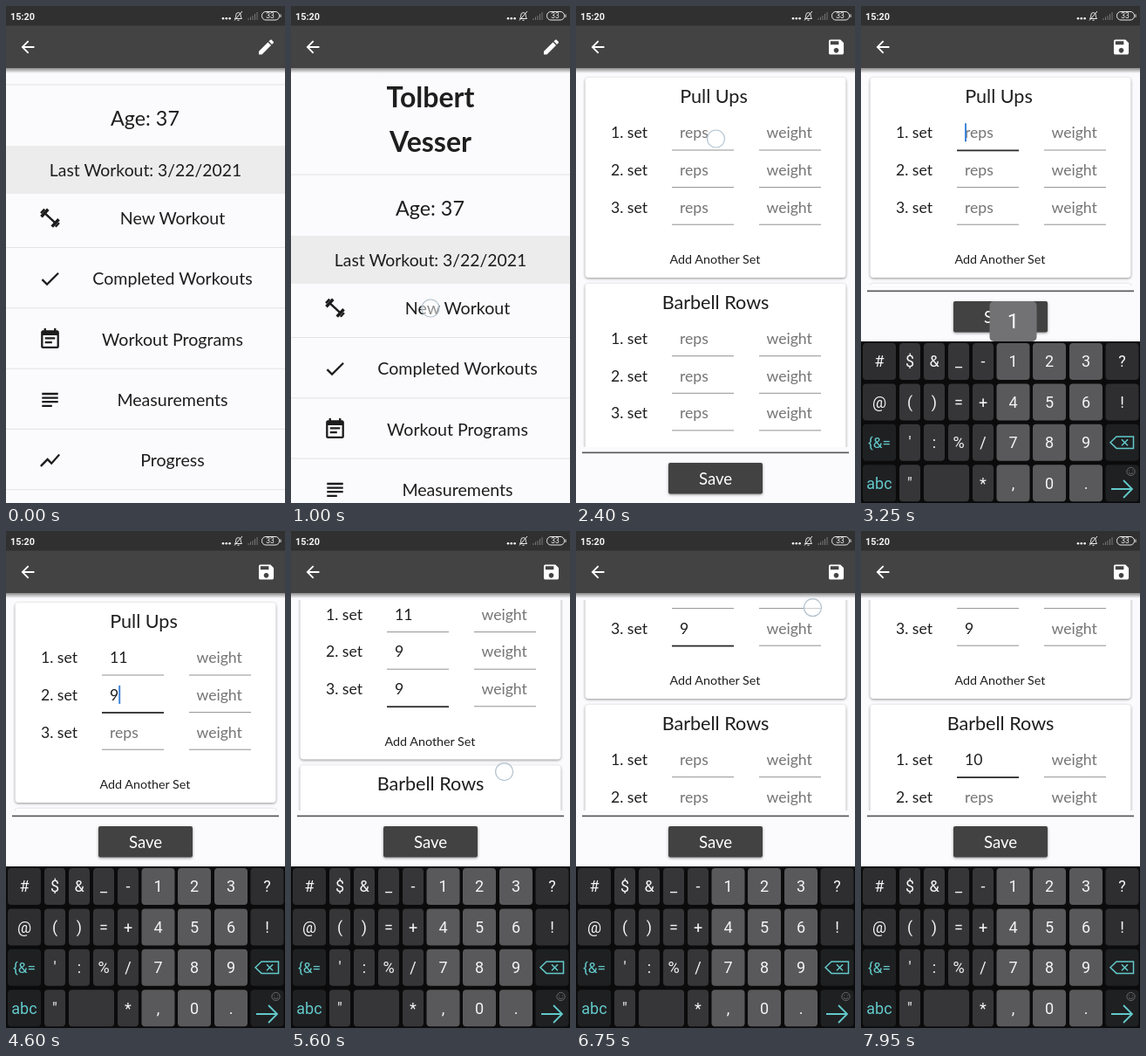
Animation, 320 px wide and 569 px high, one loop 8000 ms. Source, as an HTML page:

```html
<!DOCTYPE html>
<html lang="en">
<head>
<meta charset="utf-8">
<title>Workout log</title>
<style>
html, body { margin: 0; width: 100%; height: 100%; overflow: hidden; background: #fbfafc; }
svg { display: block; width: 100vw; height: 100vh; }
text { font-family: Lato, sans-serif; fill: #1e1e1e; white-space: pre; }
.mid { text-anchor: middle; }
.bold { font-weight: 700; }
.hint { fill: #757575; }
.white { fill: #fff; }
.page { fill: #fbfafc; }
.card { fill: #fff; filter: drop-shadow(0 1px 1.8px rgba(0,0,0,.42)); }
.rule { stroke: #e3e3e3; stroke-width: 1; }
.key, .sys { font-family: Roboto, sans-serif; fill: #f4f4f4; }
.teal { fill: #63c9ca; }
.line { fill: none; stroke: #63c9ca; stroke-width: 1.5; }
</style>
</head>
<body>
<svg id="stage" viewBox="0 0 320 569"></svg>
<script>
const LOOP = 8000;
const ICON = {
  back: 'M20 11H7.83l5.59-5.59L12 4l-8 8 8 8 1.41-1.41L7.83 13H20v-2z',
  edit: 'M3 17.25V21h3.75L17.81 9.94l-3.75-3.75L3 17.25zM20.71 7.04c.39-.39.39-1.02 0-1.41l-2.34-2.34c-.39-.39-1.02-.39-1.41 0l-1.83 1.83 3.75 3.75 1.83-1.83z',
  save: 'M17 3H5c-1.11 0-2 .9-2 2v14c0 1.1.89 2 2 2h14c1.1 0 2-.9 2-2V7l-4-4zm-5 16c-1.66 0-3-1.34-3-3s1.34-3 3-3 3 1.34 3 3-1.34 3-3 3zm3-10H5V5h10v4z',
  check: 'M9 16.17L4.83 12l-1.42 1.41L9 19 21 7l-1.41-1.41z',
  event: 'M17 10H7v2h10v-2zm2-7h-1V1h-2v2H8V1H6v2H5c-1.11 0-1.99.9-1.99 2L3 19c0 1.1.89 2 2 2h14c1.1 0 2-.9 2-2V5c0-1.1-.9-2-2-2zm0 16H5V8h14v11zm-5-5H7v2h7v-2z',
  subject: 'M14 17H4v2h10v-2zm6-8H4v2h16V9zM4 15h16v-2H4v2zM4 5v2h16V5H4z',
  chart: 'M3.5 18.49l6-6.01 4 4L22 6.92l-1.41-1.41-7.09 7.97-4-4L2 16.99z'
};

const text = (s, x, y, size, cls = '', more = '') =>
  `<text x="${x}" y="${y}" font-size="${size}" class="${cls}" ${more}>${s.replace(/&/g, '&amp;')}</text>`;
const mid = (s, x, y, size, cls = '', more = '') => text(s, x, y, size, 'mid ' + cls, more);
const rect = (x, y, w, h, more = '') => `<rect x="${x}" y="${y}" width="${w}" height="${h}" ${more}/>`;
const rule = (y, x1 = 0, x2 = 320) => `<path class="rule" d="M${x1} ${y}H${x2}"/>`;
const icon = (name, x, y, scale, fill = '#1c1c1c') =>
  `<path d="${ICON[name]}" fill="${fill}" transform="translate(${x} ${y}) scale(${scale}) translate(-12 -12)"/>`;

const appBar = action => rect(0, 71, 320, 6, 'fill="url(#shade)"') +
  rect(0, 0, 320, 71, 'fill="#434343"') + rect(0, 0, 320, 22.5, 'fill="#303030"') +
  icon('back', 25, 47, .93, '#fff') + icon(action, 298.5, 47, .95, '#fff');

const dumbbell = `<g transform="translate(50.5 242.7) rotate(43) scale(.88)" stroke="#1c1c1c" fill="none">
  <path d="M-9 0H9" stroke-width="2.8"/><path d="M-9.5 -6.5V6.5M9.5 -6.5V6.5" stroke-width="4"/>
  <path d="M-13 -3.5V3.5M13 -3.5V3.5" stroke-width="2.8"/></g>`;

function profile() {
  const rows = ['New Workout', 'Completed Workouts', 'Workout Programs', 'Measurements', 'Progress'];
  const icons = [null, 'check', 'event', 'subject', 'chart'];
  const list = rows.map((s, i) => {
    const y = 243 + 69.3 * i;
    return mid(s, 191, y + 7, 19.6) + (icons[i] ? icon(icons[i], 50.5, y, 1.15) : dumbbell) + rule(y + 33.5);
  }).join('');
  return rect(0, 0, 320, 569, 'class="page"') + '<g id="menu">' +
    mid('Tolbert', 160, 13, 32, 'bold') + mid('Vesser', 160, 64, 32, 'bold') + rule(90) +
    mid('Age: 37', 159.5, 137.4, 23.3) + rect(0, 160, 320, 55, 'fill="#ececed"') +
    mid('Last Workout: 3/22/2021', 160, 195, 19.35) + list + '</g>' + appBar('edit');
}

function sheet() {
  const items = ['PUSH', 'PULL', 'LEGS'].map((s, i) =>
    rect(7, 322 + 78 * i, 306, 71, 'rx="4" class="card"') + mid(s, 159.7, 367 + 78 * i, 23)).join('');
  return rect(0, 249, 320, 320, 'class="page"') +
    rect(3, 250, 314, 316, 'rx="4" class="card" style="fill:#ececed"') +
    mid('Choose a Program:', 156.5, 290, 28.6, 'bold') + rule(311.5, 4, 316) +
    `<g clip-path="url(#sheetClip)">${items}</g>`;
}

function exercise(name, card) {
  const top = 235.7 * card;
  let out = rect(10.5, 82 + top, 299, 229, 'rx="4" class="card"') + mid(name, 160 - (card ? 0 : 2), 111 + top, 21.6);
  for (let i = 0; i < 3; i++) {
    const y = 151.3 + top + 42.6 * i, id = card * 3 + i;
    out += text(i + 1 + '. set', 40, y, 17.6) + text('reps', 119, y, 17.6, 'hint', `id="reps${id}"`) +
      text('weight', 218.5, y, 17.6, 'hint') +
      rect(110, y + 13.2, 71, 1, `fill="#929292" id="bar${id}"`) + rect(210, y + 13.2, 71, 1, 'fill="#929292"');
  }
  return out + mid('Add Another Set', 159.5, 295.3 + top, 14.3);
}

const workout = () => rect(0, 0, 320, 569, 'class="page"') +
  '<g clip-path="url(#listClip)"><g id="list">' + exercise('Pull Ups', 0) + exercise('Barbell Rows', 1) +
  rect(0, 0, 2, 21, 'fill="#3f86d8" id="cursor"') + '</g></g>' +
  '<g id="footer">' + rect(7, 510.5, 306, 1.7, 'fill="#5a5a5a"') +
  rect(106, 523, 108, 35.5, 'rx="2" class="card" style="fill:#424242"') + mid('Save', 160, 547.7, 18.6, 'white') +
  '</g>' + appBar('save');

const COLS = [[2, 38], [44, 24], [72, 24], [100, 24], [128, 24], [155.5, 38], [197, 38], [239, 38], [280.5, 38]];
const KEYS = ['# $ & _ - 1 2 3 ?', '@ ( ) = + 4 5 6 !', "{&= ' : % / 7 8 9 <", 'abc " _ _ * , 0 . >'].map(r => r.split(' '));

function keyboard() {
  let out = rect(0, 384, 320, 185, 'fill="#0b0b0c"');
  KEYS.forEach((row, r) => row.forEach((s, c) => {
    let [x, w] = COLS[c];
    const y = 386 + 46.4 * r, last = r === 3;
    if (last && c === 3) return;
    const space = last && c === 2;
    if (space) w = 52;
    const special = r > 1 && (c === 0 || c === 8);
    const fill = special ? '#1f2022' : c > 4 && c < 8 ? '#59595b' : c % 8 ? '#363638' : '#2e2e30';
    out += rect(x, y, w, 42, `rx="4" fill="${fill}"`);
    if (!space && !(special && c === 8))
      out += mid(s, x + w / 2, y + 27.3, s === '{&=' ? 17.2 : 18, special ? 'key teal' : 'key');
  }));
  return out + `<path class="line" d="M286 499.7l7-6.7h19.5v13.4h-19.5zM299 496.2l7 7m0-7l-7 7"/>
    <path class="line" style="stroke-width:1.8" d="M287 553h24M301 543l10 10-10 10"/>
    <g fill="none" stroke="#69696b"><circle cx="309.5" cy="533" r="4.6"/><path d="M307 534.5q2.5 2.4 5 0M307.6 531.4v1M311.4 531.4v1"/></g>` +
    '<g id="popup">' + rect(-27, -48, 54, 46, 'rx="5" fill="#727274"') + mid('', 0, -17, 24, 'key', 'id="popText"') + '</g>';
}

const statusBar = () => text('15:20', 5, 16, 10.9, 'sys bold') +
  [249, 252.8, 256.6].map(x => `<circle cx="${x}" cy="14.3" r="1.3" fill="#fff"/>`).join('') +
  `<g fill="none" stroke="#e8e8e8"><path d="M262.5 14.5h8q-1.3-1.5-1.3-4.2a2.7 2.7 0 0 0-5.4 0q0 2.7-1.3 4.2M265.5 16.3h2M262 16.5l9-10.5"/>
  <path d="M278 16v-2M280.5 16v-3.5M283 16v-5M285.5 16v-7M288 16v-9" stroke="#777"/>
  <rect x="293.5" y="6.5" width="20" height="9.5" rx="4.5"/><path d="M315 9.5v3.5"/></g>` + mid('33', 303, 14.2, 8.5, 'sys');

document.getElementById('stage').innerHTML = `<defs>
  <linearGradient id="shade" x2="0" y2="1"><stop stop-opacity=".45"/><stop offset="1" stop-opacity="0"/></linearGradient>
  <clipPath id="sheetClip">${rect(3, 312, 314, 229)}</clipPath>
  <clipPath id="listClip">${rect(7, 79, 306, 426, 'id="listBox"')}</clipPath></defs>
  ${profile()}${rect(0, 0, 320, 569, 'id="scrim"')}<g id="sheet">${sheet()}</g>
  <g id="workout">${workout()}</g><g id="keyboard">${keyboard()}</g>${statusBar()}
  <circle id="touch" r="10" fill="#fff" fill-opacity=".5" stroke="#b3c3cf" stroke-width="1.2"/>`;

const el = {};
document.querySelectorAll('[id]').forEach(e => el[e.id] = e);

const part = (t, a, b) => Math.min(1, Math.max(0, (t - a) / (b - a)));
const out = (t, a, b) => 1 - (1 - part(t, a, b)) ** 2.4;
const smooth = (t, a, b) => { const p = part(t, a, b); return p * p * (3 - 2 * p); };
const move = (e, y, x = 0) => e.setAttribute('transform', `translate(${x} ${y})`);
const show = (e, on) => e.setAttribute('visibility', on ? 'visible' : 'hidden');
const within = (t, spans) => spans.find(([a, b]) => t >= a && t < b);

const FOCUS = [[2550, 0], [4200, 1], [4800, 2], [6950, 3]];
const TYPED = [[3350, 0, '1'], [3750, 0, '11'], [4550, 1, '9'], [5100, 2, '9'], [7550, 3, '1'], [7750, 3, '10']];
const CURSOR = [[2550, 3100], [3250, 4000], [4200, 5200], [6950, 7250], [7500, 7950]];
// start, end, column, row
const PRESS = [[3250, 3400, 5, 0], [4450, 4570, 7, 2], [5000, 5130, 7, 2], [7500, 7600, 5, 0], [7700, 7800, 6, 3]];
// start, end, x, y, then where and when a drag ends
const TOUCH = [[950, 1080, 160, 346], [1750, 1850, 160, 437], [2400, 2550, 160.5, 152],
  [5400, 6150, 243, 312, 250, 152, 6050], [6300, 6790, 262, 84, 271.5, 87.7, 6700]];

function draw(t) {
  move(el.menu, 103 * out(t, 200, 740));
  const open = out(t, 1050, 1340) * (1 - smooth(t, 1780, 1980));
  el.scrim.setAttribute('opacity', .55 * open);
  move(el.sheet, 320 * (1 - open));

  const page = out(t, 1790, 2000);
  el.workout.setAttribute('opacity', page);
  show(el.workout, page > 0);
  move(el.workout, 60 * (1 - page));

  const lift = 185 * out(t, 2620, 2920);
  move(el.keyboard, 185 - lift);
  move(el.footer, -lift);
  el.listBox.setAttribute('height', 426 - lift);
  move(el.list, -194 * smooth(t, 5380, 6050) + 75 * smooth(t, 6290, 6720));

  const focus = FOCUS.reduce((f, [at, id]) => t >= at ? id : f, -1);
  const values = Array(6).fill('');
  TYPED.forEach(([at, id, s]) => { if (t >= at) values[id] = s; });
  values.forEach((s, i) => {
    const label = el['reps' + i], bar = el['bar' + i], on = i === focus;
    label.textContent = s || 'reps';
    label.setAttribute('class', s ? '' : 'hint');
    bar.setAttribute('fill', on ? '#2b2b2b' : '#929292');
    bar.setAttribute('height', on ? 1.8 : 1);
  });
  const blink = focus >= 0 && within(t, CURSOR);
  el.cursor.style.display = blink ? '' : 'none';
  if (blink) move(el.cursor, +el['reps' + focus].getAttribute('y') - 17, 119 + 10.2 * values[focus].length);

  const press = within(t, PRESS);
  show(el.popup, press);
  if (press) {
    const [, , c, r] = press, [x, w] = COLS[c];
    move(el.popup, 386 + 46.4 * r, x + w / 2);
    el.popText.textContent = KEYS[r][c];
  }

  const touch = within(t, TOUCH);
  show(el.touch, touch);
  if (touch) {
    const [a, , x, y, x2 = x, y2 = y, end = a + 1] = touch, p = smooth(t, a, end);
    move(el.touch, y + (y2 - y) * p, x + (x2 - x) * p);
  }
}

const start = performance.now();
function tick() {
  draw((performance.now() - start) % LOOP);
  requestAnimationFrame(tick);
}
tick();
</script>
</body>
</html>
```
